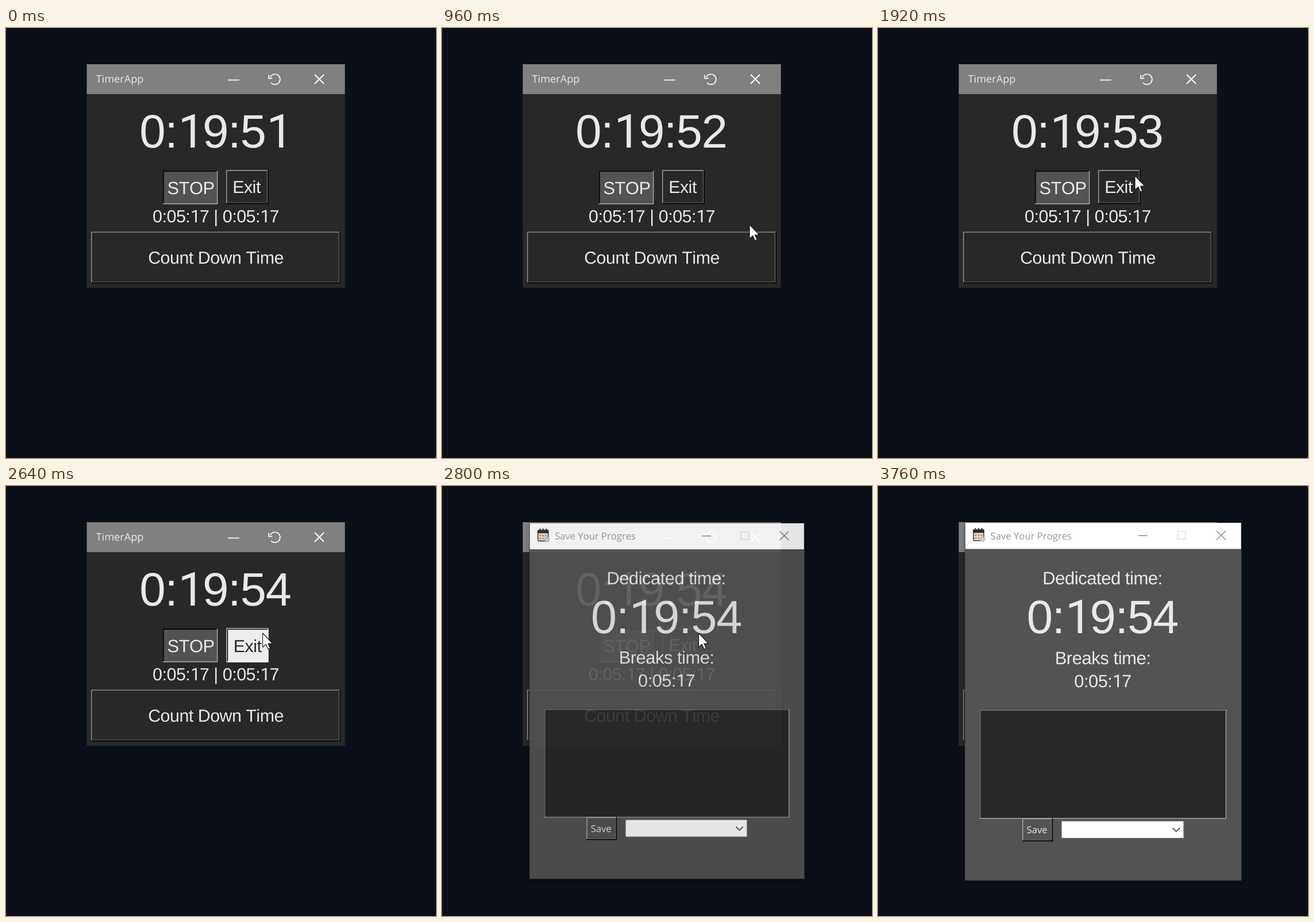
Write an HTML page that moves like this. It is 748x748 px and loops after 5120 ms.

```html
<!DOCTYPE html>
<html lang="en">
<head>
<meta charset="utf-8">
<title>TimerApp</title>
<style>
  html, body { margin: 0; width: 100%; height: 100%; overflow: hidden; background: #0b0f17; }
  svg { display: block; width: 100vw; height: 100vh; }
  text { font-family: "Liberation Sans", Arial, sans-serif; font-kerning: none; letter-spacing: -.015em; fill: #e9e9e9; text-anchor: middle; text-rendering: geometricPrecision; }
  .ui { font-family: "Open Sans", "Noto Sans", sans-serif; letter-spacing: 0; text-anchor: start; }
  .clock { font-size: 81.5px; }
  .one { font-family: Roboto, sans-serif; letter-spacing: -.04em; }
  .line { fill: none; }
</style>
</head>
<body>
<svg viewBox="0 0 748 748">
  <defs>
    <filter id="blur" x="-10%" y="-10%" width="120%" height="120%"><feGaussianBlur stdDeviation="5"/></filter>
  </defs>
  <rect width="748" height="748" fill="#0b0f17"/>

  <g id="timer">
    <rect x="140.5" y="63" width="449" height="389" fill="#282828"/>
    <rect x="140.5" y="63" width="449" height="52" fill="#808080"/>
    <text class="ui" x="156.5" y="95.3" font-size="18.2">TimerApp</text>
    <g class="line" stroke="#fff" stroke-width="1.6">
      <path d="M386 90.5H406"/>
      <path d="M459.6 85.6A9 9 0 1 1 461 95.2M457 81.5V87.6H463.4"/>
      <path d="M537 81L553 97M553 81L537 97" stroke-width="2"/>
    </g>
    <text id="clock" class="clock" x="364" y="208"></text>
    <g id="stop"></g>
    <text x="321.5" y="289" font-size="30.8">STOP</text>
    <g id="exit"></g>
    <text id="exitLabel" x="418.5" y="287.3" font-size="30.3">Exit</text>
    <text id="breaks" x="365" y="338" font-size="30.4"></text>
    <g id="count"></g>
    <text x="365" y="410" font-size="30.3">Count Down Time</text>
  </g>

  <g id="dialog">
    <rect x="152" y="66" width="480" height="622" opacity=".4" filter="url(#blur)"/>
    <rect x="151.5" y="64" width="480.5" height="622" fill="#535353"/>
    <rect x="152" y="64" width="479.5" height="45.5" fill="#fff"/>
    <path class="line" d="M151.5 109.5V686H632V109.5" stroke="#3d3f42"/>

    <g id="calendar">
      <rect x="166" y="76" width="18" height="19" rx="1.5" fill="#e9dccb" stroke="#3a3a3a" stroke-width="1.6"/>
      <rect x="165.5" y="76" width="19" height="5.5" fill="#2b2b2b"/>
      <path class="line" d="M169.5 73V78M175 73V78M180.5 73V78" stroke="#2b2b2b" stroke-width="1.8"/>
      <path class="line" d="M168.5 85.5H181.5M168.5 90.5H177" stroke="#c77a45" stroke-width="2.6" stroke-dasharray="3 2"/>
      <circle cx="182" cy="92.5" r="4.6" fill="#b9bcc0"/>
      <circle cx="182" cy="92.5" r="1.5" fill="#e6e7e9"/>
    </g>
    <text class="ui" x="195.5" y="92.7" font-size="16.7" style="fill:#959595">Save Your Progres</text>
    <g class="line" stroke="#8c8c8c" stroke-width="1.6">
      <path d="M453 86.3H468.5"/>
      <rect x="521.5" y="79.3" width="13.5" height="13" stroke="#e2e2e2"/>
      <path d="M589 78L605 93.5M605 78L589 93.5"/>
    </g>

    <text x="390.5" y="171" font-size="31">Dedicated time:</text>
    <text id="total" class="clock" x="390.5" y="256"></text>
    <text x="391" y="310" font-size="31">Breaks time:</text>
    <text id="pause" x="391" y="350" font-size="30.8"></text>
    <g id="notes"></g>
    <g id="save"></g>
    <text class="ui" x="258.5" y="604" font-size="16.7">Save</text>
    <rect x="319.3" y="583" width="212.4" height="29.5" fill="#fff" stroke="#8a8a8a"/>
    <path class="line" d="M512.5 595L518.7 601L525 595" stroke="#555" stroke-width="1.9"/>
  </g>

  <path id="cursor" d="M0 0V24.5L5.6 19.3L9.3 27.8L13 26.2L9.3 18H17Z" fill="#fff" stroke="#15171b" stroke-width="1.1" stroke-linejoin="round"/>
</svg>
<script>
const LOOP = 5120, STEP = 80;
const $ = id => document.getElementById(id);

const rect = (x, y, w, h, fill) => `<rect x="${x}" y="${y}" width="${w}" height="${h}" fill="${fill}"/>`;
const edge = (d, color, width) => `<path class="line" d="${d}" stroke="${color}" stroke-width="${width}"/>`;

// Sets digits with a footless "1"
function setDigits(id, text) {
  $(id).innerHTML = text.replace(/1/g, '<tspan class="one" dx=".02em">1</tspan>');
}

function raised(x, y, r, b, fill, light) {
  return rect(x, y, r - x, b - y, fill) +
    edge(`M${r - 2} ${y + 2}V${b - 2}H${x + 2}`, '#6e6e6e', 1.2) +
    edge(`M${r - .6} ${y}V${b - .6}H${x}`, '#050505', 1.6) +
    edge(`M${x + .7} ${b - 1.5}V${y + .7}H${r - 1.5}`, light, 1.4);
}

function sunken(x, y, r, b, fill, dark, light) {
  return rect(x, y, r - x, b - y, fill) +
    edge(`M${x + 1} ${b}V${y + 1}H${r}`, dark, 1.8) +
    edge(`M${r - .7} ${y}V${b - .7}H${x - .5}`, light, 1.4);
}

const exitUp = raised(383, 247, 456.5, 306, '#282828', '#a0a0a0');
const exitDown = sunken(384.2, 248.2, 456.5, 306.5, '#ededed', '#0a0a0a', '#fff') +
  edge('M383.7 306.5V247.7H456.5', '#b0b0b0', 1.4);

$('stop').innerHTML = sunken(273, 248, 368.3, 306.5, '#535353', '#0a0a0a', '#a8a8a8');
$('count').innerHTML = raised(148, 354.4, 581.5, 444, '#282828', '#959595');
$('notes').innerHTML = sunken(177, 389, 606, 579, '#282828', '#666', '#a6a6a6');
$('save').innerHTML = raised(251, 578, 304, 618, '#535353', '#b0b0b0');
setDigits('breaks', '0:05:17 | 0:05:17');
setDigits('total', '0:19:54');
setDigits('pause', '0:05:17');

// Pointer track: time, x, y
const track = [
  [720, 600, 399], [800, 577, 380], [880, 552, 358], [960, 535, 342],
  [1040, 531, 320], [1120, 530, 311], [1360, 530, 311], [1440, 524, 307],
  [1600, 487, 287], [1760, 456, 262], [1840, 452, 257], [1920, 447, 257],
  [2080, 447, 257], [2240, 446.5, 256], [3600, 446.5, 256], [3680, 530, 294]
];

function pointer(t) {
  if (t < 720 || t >= 3760) return null;
  const i = track.findIndex(p => p[0] >= t);
  if (i <= 0) return track[0].slice(1);
  const [t0, x0, y0] = track[i - 1], [t1, x1, y1] = track[i];
  const k = (t - t0) / (t1 - t0);
  return [x0 + (x1 - x0) * k, y0 + (y1 - y0) * k];
}

const ticks = [400, 1360, 2400];

function draw(time) {
  const t = Math.floor((time % LOOP) / STEP) * STEP;

  setDigits('clock', '0:19:' + (51 + ticks.filter(k => t >= k).length));

  const down = t >= 2560 && t < 2720;
  $('exit').innerHTML = down ? exitDown : exitUp;
  $('exitLabel').style.fill = down ? '#282828' : '';
  $('exitLabel').setAttribute('transform', down ? 'translate(1.6 1.5)' : '');

  // The dialog fades in while growing to full size
  const rest = t < 2960 ? Math.pow(.28, (t - 2720) / STEP) : 0;
  const s = 1 - .021 * rest;
  $('dialog').style.display = t < 2720 ? 'none' : '';
  $('dialog').setAttribute('opacity', Math.max(0, 1 - .38 * rest));
  $('dialog').setAttribute('transform', `matrix(${s} 0 0 ${s} ${6.7 * rest} ${4.3 * rest})`);

  const p = pointer(t);
  $('cursor').style.display = p ? '' : 'none';
  if (p) $('cursor').setAttribute('transform', `translate(${p[0]} ${p[1]})`);
}

let last = -1;
function loop() {
  const now = performance.now(), step = Math.floor(now / STEP);
  if (step !== last) draw(now);
  last = step;
  requestAnimationFrame(loop);
}
loop();
</script>
</body>
</html>
```
